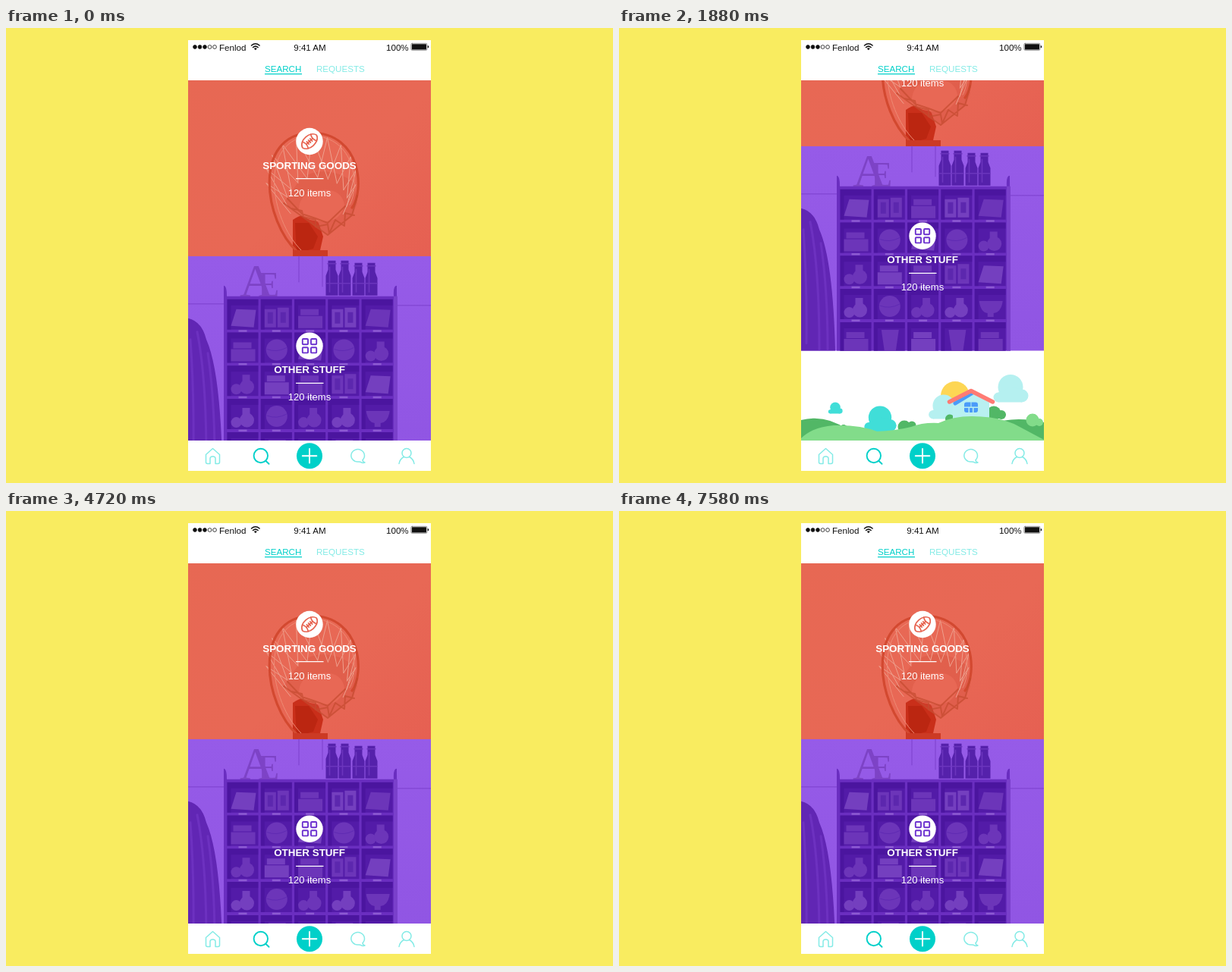
Recreate the animation shown at these times as an HTML page. Size 800x600 px, loop 8200 ms.

```html
<!DOCTYPE html>
<html lang="en">
<head>
<meta charset="utf-8">
<title>Pull to reveal</title>
<style>
  html, body { margin: 0; width: 100%; height: 100%; overflow: hidden; background: #f9ec60; }
  svg { display: block; width: 800px; height: 600px; font-family: "Liberation Sans", Arial, sans-serif; }
  .line { fill: none; stroke-linecap: round; stroke-linejoin: round; }
  .pale { stroke: #84ebe6; stroke-width: 1.5; }
  .teal { stroke: #00d0c9; stroke-width: 1.9; }
</style>
</head>
<body>
<svg viewBox="0 0 800 600">
  <defs>
    <clipPath id="view"><rect x="240" y="69" width="320" height="475"/></clipPath>
    <clipPath id="photo"><rect x="240" width="320" height="270"/></clipPath>
    <linearGradient id="sky" x2="1" y2="1"><stop stop-color="#e76853"/><stop offset=".6" stop-color="#e86855"/><stop offset="1" stop-color="#e66052"/></linearGradient>
    <linearGradient id="wall" x2="0" y2="1"><stop stop-color="#965be8"/><stop offset="1" stop-color="#9055e3"/></linearGradient>
    <g id="cloud">
      <circle cy="-20" r="16.5"/><circle cx="-16" cy="-6.5" r="6.5"/><circle cx="15" cy="-8.5" r="8.5"/>
      <path d="M-16 0V-13L0-20 15-17V0z"/>
    </g>
    <g id="label" fill="#fff">
      <circle cx="400" cy="118.5" r="17.700"/><path d="M382 167h36.500v1.300H382z"/>
      <text x="400" y="190.500" font-size="13" text-anchor="middle">120 items</text>
    </g>
  </defs>

  <rect width="800" height="600" fill="#f9ec60"/>
  <rect x="240" y="16" width="320" height="568" fill="#fff"/>

  <g clip-path="url(#view)">
    <g id="shower">
      <path class="line" d="M400 102V99a9 8.500 0 0 1 18 0V123" stroke="#509ffa" stroke-width="3"/>
      <path d="M391 108a9 9 0 0 1 18 0l2 2.500q0 1.500-2 1.500H391q-2.500 0-2.500-1.500z" fill="#4b9bf8"/>
      <path d="M381 150V132a17.500 17.500 0 0 1 35 0V150q0 4-4 3-3-1-3-4-4-3-6 1-5 3-8-4-5-1-6 4-6 4-8 0z" fill="#fdd654"/>
      <g id="drops" fill="#a9eeeb"></g>
      <path class="line" d="M386 143q5-10 10-6M391 147q4-7 8-5M400 132q3 6 11-2M403 139l7-3" stroke="#fff" stroke-width="1.400"/>
    </g>

    <g id="scene">
      <circle id="sun" r="19" fill="#fdd654"/>
      <g id="clouds"></g>
      <path d="M240 517Q272 509 300 529L340 535H480L505 518Q530 513 560 520V570H240zM432 520a5.500 5.500 0 0 1 8-9v9z" fill="#52b766"/>
      <g fill="#52b766">
        <circle cx="296" cy="527.500" r="4.500"/><circle cx="376" cy="526" r="8.500"/><circle cx="386" cy="524" r="5.500"/>
        <circle cx="494" cy="508" r="9.500"/><circle cx="504" cy="510" r="6"/>
      </g>
      <path d="M440 518V494L465 480 488 494V518z" fill="#b9f0f1"/>
      <path class="line" d="M443 495L466 481" stroke="#4a9bf9" stroke-width="5"/>
      <path class="line" d="M435.500 493L464 478.500 492.500 493" stroke="#ff7b74" stroke-width="5.500"/>
      <path d="M455 499.500v-3q0-3 3-3h5.500v6zm9.500 0v-6h5.500q3 0 3 3v3zM455 501h5.500v6H458q-3 0-3-3zm7 0h4v6h-4zm5.500 0h5.500v3q0 3-3 3h-2.500z" fill="#4a9bf9"/>
      <g fill="#82dc8a">
        <circle cx="545" cy="517" r="8.500"/><circle cx="554" cy="520" r="5"/>
        <path d="M240 541Q255 526 283 524 318 523 340 532 365 531 385 526 400 520 421 521 440 512 465 512 505 512 530 527L560 543V570H240z"/>
      </g>
    </g>

    <g id="sports">
      <rect x="240" width="320" height="270.500" fill="url(#sky)"/>
      <path d="M378 222q18-14 34 4l6 18-6 27H378z" fill="#c62a14" opacity=".9"/>
      <path d="M381 226h18l12 18-6 16-22 6z" fill="#b3200c" opacity=".6"/>
      <path d="M366 200L388 168Q420 146 458 172L463 200 456 216 424 242 408 232 392 216z" fill="#d55440" opacity=".4"/>
      <path d="M386 214q-2-28 26-31 30-4 34 19-4 22-28 22-20 0-32-10z" fill="#e86855"/>
      <g id="net" class="line" stroke="#eea08e" stroke-width="1"></g>
      <path class="line" d="M384 264C340 225 324 110 402 107 470 108 472 185 456 206" stroke="#d34930" stroke-width="3.200"/>
      <path class="line" d="M389 262C347 220 332 116 402 111 462 112 466 180 453 202" stroke="#ee8a74" stroke-width="1"/>
      <path class="line" d="M366 200L424 242 456 216 463 190M371 194L390 214 408 220 424 226 447 204M376 207l14 3 2 8 16 4 0 9 16-3 2 12 8-18 12 8 1-17 12 3" stroke="#c54a30" stroke-width="2" opacity=".7"/>
      <path d="M378 262h46v8.500h-46z" fill="#cc3a24"/>
      <use href="#label"/>
      <text x="400" y="154.800" font-size="13.400" font-weight="bold" fill="#fff" text-anchor="middle">SPORTING GOODS</text>
      <g class="line" transform="translate(400 118.500) rotate(-42)" stroke="#e76350" stroke-width="1.700">
        <path d="M-12.500 0C-10-10 10-10 12.500 0 10 10-10 10-12.500 0zM-7.500-6q3.500 6 0 12M7.500-6q-3.500 6 0 12M-4.500 0h9M-3-2.200v4.400M0-2.200v4.400M3-2.200v4.400"/>
      </g>
    </g>

    <g id="stuff" clip-path="url(#photo)">
      <rect x="240" width="320" height="270" fill="url(#wall)"/>
      <path class="line" d="M240 63H290M514 65H560M386 0V34M417 0V40" stroke="#8448d6" stroke-width="1.500"/>
      <path d="M240 82q18 4 24 28 18 40 21 160H240z" fill="#6126b4"/>
      <path class="line" d="M252 100q12 60 12 168M243 110q5 70 4 150M266 128q9 60 9 140" stroke="#6d31c0" stroke-width="3"/>
      <g fill="#7d43c6" font-family="Liberation Serif, serif">
        <text x="308" y="53" font-size="62">A</text><text x="332" y="53" font-size="46">E</text>
      </g>
      <g id="glasses"></g>
      <path d="M287 39q4 0 4 14H511q-1-14 4-14l1 231H287z" fill="#6a2ec0"/>
      <path d="M511 53h5v217h-5z" fill="#7a40cb"/>
      <g id="shelf"></g>
      <use href="#label"/>
      <text x="400" y="154.800" font-size="13.400" font-weight="bold" fill="#fff" text-anchor="middle">OTHER STUFF</text>
      <g id="tiles" class="line" stroke="#6c32cf" stroke-width="1.900"></g>
    </g>
  </g>

  <g font-size="11.600" fill="#111">
    <g id="signal" stroke="#111" stroke-width=".800"></g>
    <text x="281" y="29.700">Fenlod</text>
    <text x="400.500" y="29.700" text-anchor="middle">9:41 AM</text>
    <text x="501" y="29.700">100%</text>
    <path class="line" d="M323.500 23q5.300-4.500 10.600 0M325.500 25.500q3.300-2.800 6.600 0" stroke="#111" stroke-width="1.600"/>
    <path d="M326.800 27q2-1.500 4 0l-2 2.200z"/>
    <rect class="line" x="533.800" y="20.300" width="21.200" height="9" rx="1.500" stroke="#555" stroke-width=".600"/>
    <rect x="534.800" y="21.200" width="19.200" height="7.200" rx=".500"/><path d="M555.700 23q1.600.300 1.600 1.800t-1.600 1.800z"/>
    <text x="341" y="57.800" fill="#00d0c9">SEARCH</text>
    <path d="M341 60h49v1.200H341z" fill="#00d0c9"/>
    <text x="409" y="57.800" fill="#84ebe6">REQUESTS</text>
  </g>

  <g class="line">
    <path class="pale" d="M263.500 562.500L272.500 554.500 281.500 562.500V572.500q0 2-2 2H276V568q0-3-3.500-3t-3.500 3V574.500H265.500q-2 0-2-2z"/>
    <circle class="teal" cx="335.800" cy="564" r="9.200"/><path class="teal" d="M342.500 571L346.500 574.800"/>
    <circle cx="400" cy="564.200" r="17" fill="#00d0c9"/>
    <path d="M400 555v18.500M390.800 564.200h18.500" stroke="#fff" stroke-width="2"/>
    <path class="pale" d="M470 569.500A8.800 8.200 0 1 0 464 572q3-.400 4.500 1 2 .800 4.500 0-3-1-3-3.500z"/>
    <circle class="pale" cx="528" cy="560.500" r="6"/><path class="pale" d="M518 574.500q1-6 6.500-9M538 574.500q-1-6-6.500-9"/>
  </g>
</svg>
<script>
const $ = id => document.getElementById(id);
const repeat = (n, make) => Array.from({ length: n }, (_, i) => make(i)).join('');
const move = (node, x, y, scale = 1) => node.setAttribute('transform', `translate(${x} ${y}) scale(${scale})`);

// Static repeated details
$('signal').innerHTML = repeat(5, i =>
  `<circle cx="${249 + i * 6.5}" cy="25" r="2.400" fill="${i < 3 ? '#111' : '#fff'}"/>`);

$('tiles').innerHTML = repeat(4, i =>
  `<rect x="${390.8 + i % 2 * 11.2}" y="${109.3 + (i >> 1) * 11.2}" width="7.200" height="7.200" rx="1"/>`);

// Strings cross from the rim to a smaller inner ring
const ring = (i, cx, cy, rx, ry) => {
  const a = Math.PI * (.95 + i / 9);
  return `${cx + rx * Math.cos(a)} ${cy + ry * Math.sin(a)}`;
};
$('net').innerHTML = repeat(11, i => {
  const rim = ring(i, 402, 165, 60, 55);
  return `<path d="M${ring(i - 1, 410, 198, 40, 32)}L${rim}L${ring(i + 1, 410, 198, 40, 32)}"/>`;
});

$('glasses').innerHTML = repeat(4, i => {
  const x = 421.5 + i * 17 + (i > 1 ? 1 : 0), h = i < 2 ? 46 : 43;
  return `<path d="M${x + 3} ${52 - h}h10v12l3 8v${h - 20}H${x}V${72 - h}l3-8z" fill="#5521ab"/>
    <path d="M${x + 2} ${56 - h}h12M${x} 36h16M${x + 5} ${60 - h}V48" stroke="#6b35bd" stroke-width="1.600"/>`;
});

const books = '<path d="M5 13h15v24H5zM22 11h15v26H22z"/><path d="M9 17h7v15H9zM26 17h7v14h-7z" fill="#5c27ae"/>';
const ball = '<circle cx="21" cy="23" r="14"/><path d="M8 22q13 5 26-2" stroke="#5f2ab3" fill="none"/>';
const box = '<path d="M8 13h24v8H8zM5 22h32v16H5z"/>';
const bowl = '<path d="M6 16h31q-2 15-12 16v5H17v-5Q8 31 6 16z"/>';
const pots = '<circle cx="12" cy="31" r="7"/><circle cx="26" cy="28" r="9.500"/><path d="M20 12h10v10H20z"/>';
const cup = '<path d="M10 10h23l-4 28H14z"/>';
const slant = '<path d="M5 35l7-22 26 1-3 23z"/>';
const rows = [
  [slant, books, box, books, slant],
  [box, ball, slant, ball, pots],
  [pots, box, box, books, slant],
  [pots, ball, pots, pots, bowl],
  [box, cup, box, cup, box]
];
$('shelf').innerHTML = rows.map((row, r) => row.map((item, c) =>
  `<g transform="translate(${291.5 + c * 44.3} ${57 + r * 43.8})">
    <path d="M0 0h41v40H0z" fill="#531ba8"/><path d="M0 0h41v8H0zM0 0h5v40H0z" fill="#46119a" opacity=".6"/>
    <g fill="${(r + c) % 3 ? '#6c35b9' : '#743fbf'}">${item}</g><path d="M15 40.500h11v2.500H15z" fill="#8c5ad2"/>
  </g>`).join('')).join('');

// Clouds: resting x, baseline y, drift, scale, colour
const clouds = [
  [516, 493.5, 14, 1, '#b5f0f0'],
  [428, 515.5, -38, .88, '#b5f0f0'],
  [285, 508.5, 20, .41, '#40ded8'],
  [344, 532, -21, .92, '#40ded8']
];
$('clouds').innerHTML = clouds.map(c => `<use href="#cloud" fill="${c[4]}"/>`).join('');
$('drops').innerHTML = repeat(3, () => '<path d="M0-6q4 6 4 9a4 4 0 0 1-8 0q0-3 4-9z"/>');

const LOOP = 8200, HALF = 3960, PARALLAX = .81;
const ease = u => {
  u = Math.min(1, Math.max(0, u));
  return u < .5 ? 4 * u ** 3 : 1 - 4 * (1 - u) ** 3;
};
const pull = t => ease((t - 760) / 630) - ease((t - 3220) / 390);

function draw() {
  const t = performance.now() % LOOP;
  const scroll = 158 * pull(t - HALF) - 145 * pull(t);
  move($('sports'), 0, 31 + scroll);
  move($('stuff'), 0, 300.7 + scroll);
  move($('scene'), 0, PARALLAX * (scroll + 145));
  move($('shower'), 0, PARALLAX * (scroll - 158));

  const drift = (t - 1880) / 1260;
  move($('sun'), 443 - 12 * drift - 6 * drift ** 2, 485 - 6 * drift);
  clouds.forEach(([x, y, dx, scale], i) => move($('clouds').children[i], x + dx * drift, y, scale));

  [...$('drops').children].forEach((drop, i) => {
    const fall = (t / 800 + i / 3 + .04) % 1;
    move(drop, 398 + (i - 1) * 3, 118 + 31 * fall, .95 * Math.sin(Math.PI * fall));
  });
  requestAnimationFrame(draw);
}
draw();
</script>
</body>
</html>
```
